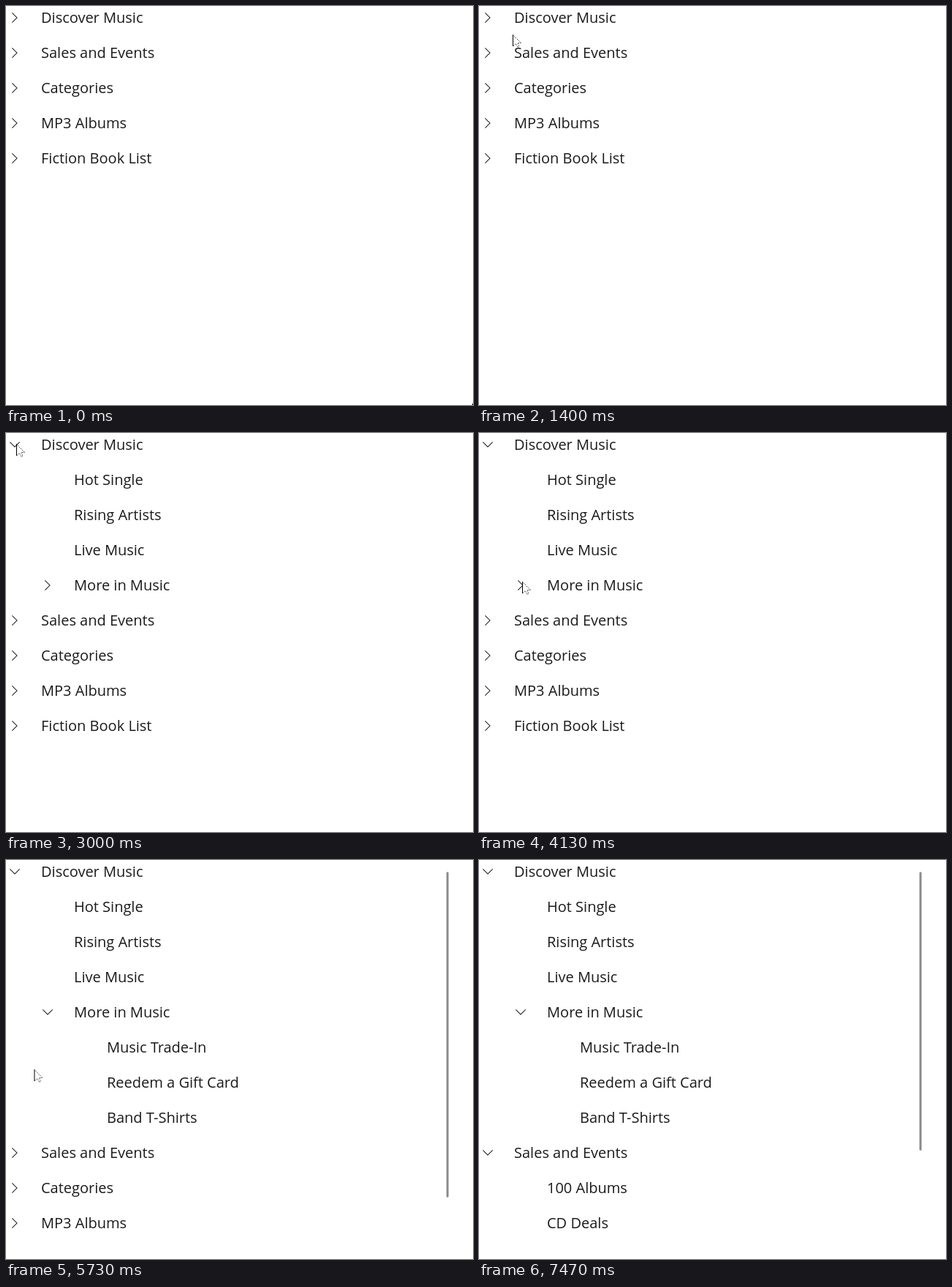
These frames come from a looping animation (639x545 px, 8.59 s). An HTML page:

```html
<!DOCTYPE html>
<html lang="en">
<head>
<meta charset="utf-8">
<title>Tree view</title>
<style>
  html, body { margin: 0; width: 100%; height: 100%; overflow: hidden; background: #fff; }
  body { position: relative; }

  ul { list-style: none; margin: 0; padding: 0; }
  .tree {
    position: absolute; top: -8px; left: 0; width: 600px; height: 528px; overflow: hidden;
    font: 20px/47px "Open Sans", "Noto Sans", sans-serif; color: #1b1b1b; white-space: nowrap;
  }
  li { --turn: 0deg; --max: 0px; }
  li ul { margin-left: 45px; overflow: hidden; max-height: var(--max); }
  span { display: block; position: relative; height: 48px; padding-left: 48px; }

  /* chevron, turning about the middle of its slot */
  .node > span::before {
    content: ""; position: absolute; left: 8px; top: 17px; width: 8px; height: 14px;
    background: #1b1b1b;
    clip-path: polygon(0 .7px, .7px 0, 7.7px 7px, .7px 14px, 0 13.3px, 6.3px 7px);
    transform-origin: 4px 7px; transform: rotate(var(--turn));
  }

  .music, .more, .sales, .thumb, .cursor { animation: 8590ms step-end infinite; }
  .music { animation-name: music; }
  .more { animation-name: more; }
  .sales { animation-name: sales; }
  .thumb { animation-name: thumb; }
  .cursor { animation-name: cursor; }

  @keyframes music {
    0% { --turn: 0deg; --max: 0px; }
    34.9%, 100% { --turn: 90deg; --max: 999px; }
  }
  @keyframes more {
    0% { --turn: 0deg; --max: 0px; }
    56.63%, 100% { --turn: 90deg; --max: 999px; }
  }
  @keyframes sales {
    0% { --turn: 0deg; --max: 0px; }
    79.92%, 100% { --turn: 90deg; --max: 999px; }
  }
  @keyframes thumb {
    0% { height: 0; }
    56.63% { height: 444.6px; }
    79.92%, 100% { height: 380.6px; }
  }

  /* pointer moves in 15 steps a second, resting between moves */
  @keyframes cursor {
    0% { transform: translate(638px, 543px); }
    5.4% { transform: translate(638px, 543px); animation-timing-function: steps(2, jump-start); }
    6.95% { transform: translate(562px, 481px); animation-timing-function: steps(4, jump-start); }
    10.06% { transform: translate(162px, 151px); animation-timing-function: steps(2, jump-start); }
    11.61% { transform: translate(97px, 98px); }

    13.93% { transform: translate(97px, 98px); animation-timing-function: steps(4, jump-start); }
    17.04% { transform: translate(46px, 39px); animation-timing-function: steps(3, jump-start); }
    19.37% { transform: translate(24px, 22px); animation-timing-function: steps(6, jump-start); }
    24.03% { transform: translate(14px, 15px); }

    40.33% { transform: translate(14px, 15px); animation-timing-function: steps(3, jump-start); }
    42.65% { transform: translate(22px, 55px); animation-timing-function: steps(4, jump-start); }
    45.75% { transform: translate(52px, 165px); animation-timing-function: steps(3, jump-start); }
    48.07% { transform: translate(62px, 200px); animation-timing-function: step-start; }
    48.86% { transform: translate(59px, 203px); }

    63.61% { transform: translate(59px, 203px); animation-timing-function: steps(3, jump-start); }
    65.94% { transform: translate(52px, 240px); animation-timing-function: steps(5, jump-start); }
    69.81% { transform: translate(18px, 355px); animation-timing-function: steps(3, jump-start); }
    72.14% { transform: translate(11px, 390px); animation-timing-function: steps(2, jump-start); }
    73.66% { transform: translate(13px, 395px); }

    84.56% { transform: translate(13px, 395px); animation-timing-function: step-start; }
    85.34% { transform: translate(20px, 415px); animation-timing-function: steps(2, jump-start); }
    86.89%, 100% { transform: translate(53px, 560px); }
  }

  svg { position: absolute; left: 0; top: 0; width: 639px; height: 545px; overflow: hidden; }
  .thumb { fill: #8a8a8a; }
  .cursor path { fill: none; stroke: #000; }
  .cursor .body { fill: #fff; stroke: none; }
  .cursor .dots { stroke-width: .9; stroke-dasharray: 1.2 1.4; }
</style>
</head>
<body>
<ul class="tree">
  <li class="node music"><span>Discover Music</span>
    <ul>
      <li><span>Hot Single</span></li>
      <li><span>Rising Artists</span></li>
      <li><span>Live Music</span></li>
      <li class="node more"><span>More in Music</span>
        <ul>
          <li><span>Music Trade-In</span></li>
          <li><span>Reedem a Gift Card</span></li>
          <li><span>Band T-Shirts</span></li>
        </ul>
      </li>
    </ul>
  </li>
  <li class="node sales"><span>Sales and Events</span>
    <ul>
      <li><span>100 Albums</span></li>
      <li><span>CD Deals</span></li>
    </ul>
  </li>
  <li class="node"><span>Categories</span></li>
  <li class="node"><span>MP3 Albums</span></li>
  <li class="node"><span>Fiction Book List</span></li>
</ul>
<svg viewBox="0 0 639 545">
  <rect class="thumb" x="602.6" y="16.2" width="3" height="0" rx="1.5"/>
  <g class="cursor">
    <path class="body" d="M.5 .5V16L4.5 12.5L7 17.5L9 16.5L7 11.5H11.5Z"/>
    <path d="M.5 0V16"/>
    <path class="dots" d="M.5 .5L11.5 11.5H7L9 16.5L7 17.5L4.5 12.5L.5 16"/>
  </g>
</svg>
</body>
</html>
```
